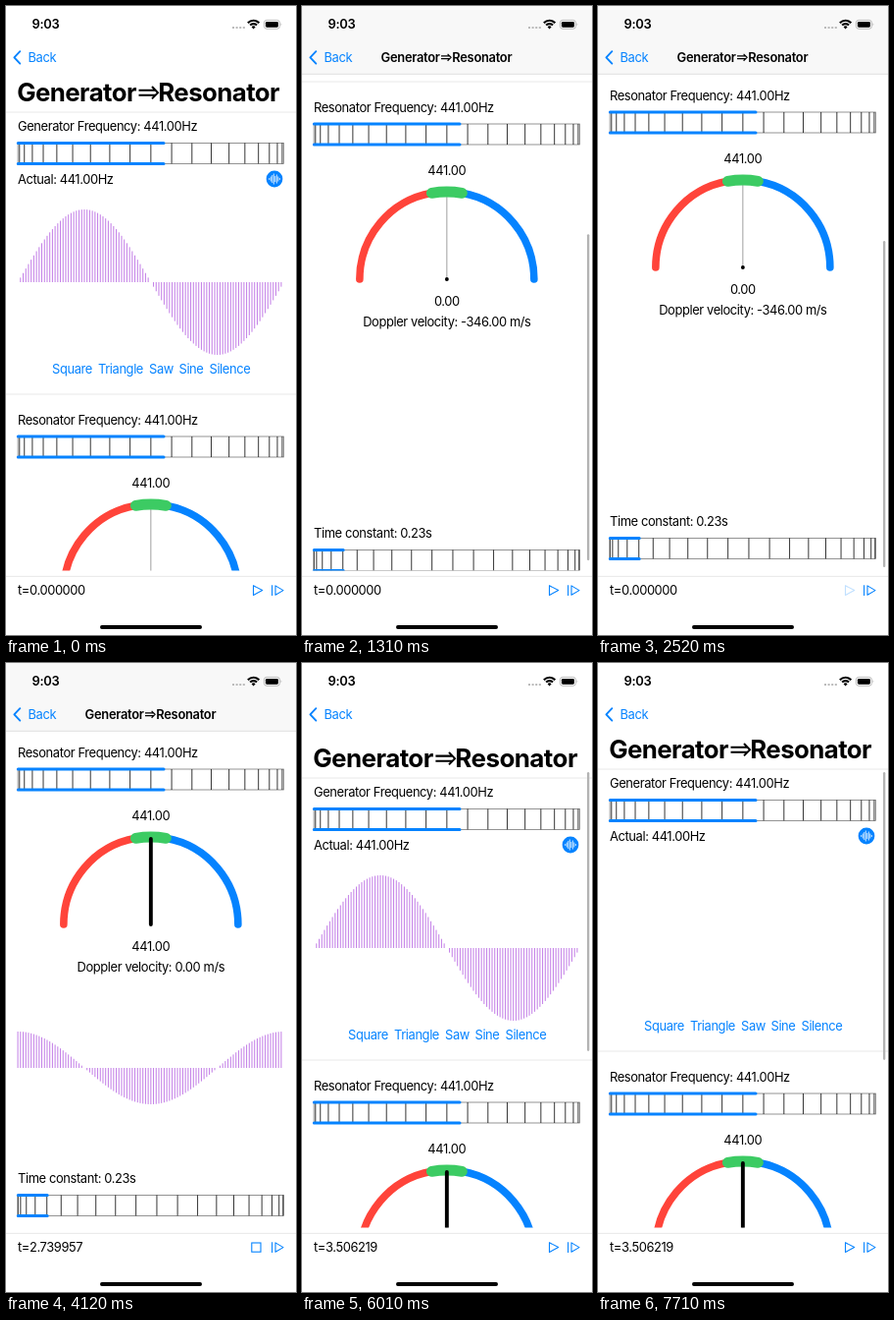
Recreate the animation shown at these times as an HTML page. Size 296 px wide and 640 px high, loop 8 s.

```html
<!DOCTYPE html>
<html lang="en">
<head>
<meta charset="utf-8">
<title>Generator and Resonator</title>
<style>
html, body { margin: 0; height: 100%; overflow: hidden; background: #fff; }
svg { display: block; width: 100vw; height: 100vh; }
text { font: 12.9px Inter, Roboto, sans-serif; letter-spacing: -.03em; white-space: pre; }
.mid { text-anchor: middle; }
.bold { font-weight: 600; letter-spacing: -.022em; }
.large { font-size: 25.8px; font-weight: 700; letter-spacing: -.022em; }
.blue { fill: #0583ff; }
.line { fill: none; stroke: #0583ff; }
.rule { stroke: #e2e2e2; stroke-width: .8; }
.bars { stroke: #af52de; stroke-width: .76; }
</style>
</head>
<body>
<svg id="stage" viewBox="0 0 296 640"></svg>
<script>
const LOOP = 8000, C = 147.85, LEFT = 12.1, WIDTH = 271.5;
const DIAL_Y = 596, R = 89;
const TUNED = 441, SOUND = 346, END = 330, LAST_T = 3.506219;

const text = (x, y, s, cls = '', id = '') => `<text x="${x}" y="${y}" class="${cls}" id="${id}">${s}</text>`;
const rule = y => `<path class="rule" d="M0 ${y}H296"/>`;

// A wheel seen from the side: evenly turned ticks, bunched at both ends
function slider(y, end, turn = 0) {
  let ticks = '';
  for (let k = -10; k <= 9; k++) {
    const a = k * Math.PI / 20 + turn;
    if (Math.abs(a) < 1.57) ticks += `M${C + WIDTH / 2 * Math.sin(a)} ${y}v21`;
  }
  return `<rect x="${LEFT}" y="${y}" width="${WIDTH}" height="21" fill="none" stroke="#666" stroke-width=".7"/>
    <path d="${ticks}" stroke="#111" stroke-width=".85"/>
    <path class="line" stroke-width="3" stroke-linecap="round" d="M12.3 ${y}H${end}M12.3 ${y + 21}H${end}"/>`;
}

function bars(y, amp, wave) {
  let d = '';
  if (amp > .05)
    for (let i = 0; i < 100; i++)
      d += `M${(LEFT + WIDTH * i / 100).toFixed(2)} ${y}v${(-amp * wave(i * Math.PI / 50)).toFixed(2)}`;
  return d;
}

// Arc between two angles in degrees, measured from straight up
function arc(from, to, color, width) {
  const p = a => `${C + R * Math.sin(a * Math.PI / 180)} ${DIAL_Y - R * Math.cos(a * Math.PI / 180)}`;
  return `<path d="M${p(from)}A${R} ${R} 0 0 1 ${p(to)}" fill="none" stroke="${color}" stroke-width="${width}" stroke-linecap="round"/>`;
}

const shapes = [['Square', 47], ['Triangle', 94], ['Saw', 146], ['Sine', 176.5], ['Silence', 207.5]];
const voice = [2, 5, 8, 11, 6, 9, 5, 2].map((h, i) => `M${268.8 + i * 1.5} ${176 - h / 2}v${h}`).join('');
const wifi = r => `M${252.6 - r * .72} ${23 - r * .72}A${r} ${r} 0 0 1 ${252.6 + r * .72} ${23 - r * .72}`;

stage.innerHTML = `
<clipPath id="view"><rect y="69" width="296" height="505.5"/></clipPath>
<g clip-path="url(#view)"><g id="content">
  <g id="heading">
    ${text(11.2, 97, 'Generator', 'large')}
    <path d="M135.5 85.7H152M135.5 90.7H152M149 82l6 6.2-6 6.2" fill="none" stroke="#000" stroke-width="2"/>
    <text x="279" y="97" class="large" text-anchor="end">Resonator</text>
  </g>
  ${rule(108)}
  ${text(12, 127, 'Generator Frequency: 441.00Hz')}
  ${slider(139.4, 161)}
  ${text(12, 181, 'Actual: 441.00Hz')}
  <circle class="blue" cx="274" cy="176" r="8.4"/>
  <path d="${voice}" stroke="#fff" stroke-width=".8"/>
  <path id="input" class="bars"/>
  ${shapes.map(([s, x]) => text(x, 374, s, 'blue')).join('')}
  ${rule(395)}
  ${text(12, 426, 'Resonator Frequency: 441.00Hz')}
  ${slider(438, 161)}
  ${text(C, 490, '441.00', 'mid')}
  ${arc(-90, -10, '#ff443a', 7.6)}
  ${arc(10, 90, '#0583ff', 7.6)}
  <path d="M${C} ${DIAL_Y}v-${R}" stroke="#888" stroke-width=".8"/>
  ${arc(-10, 10, '#3ccb63', 11)}
  <path id="needle" stroke="#000" stroke-width="3.9" stroke-linecap="round"/>
  ${text(C, 622.5, '', 'mid', 'freq')}
  ${text(C, 644, '', 'mid', 'doppler')}
  <path id="output" class="bars"/>
  ${text(12, 859, 'Time constant: 0.23s')}
  ${slider(871.4, 42.2, .045)}
</g></g>
<g id="bar">
  <rect width="296" height="69.3" fill="#f8f8f8"/>
  <path d="M0 69.3H296" stroke="#dadada" stroke-width=".8"/>
  ${text(80.6, 57, 'Generator', 'bold')}
  <path d="M142 50.9h8.4M142 53.7h8.4M148.6 48.9l3.5 3.4-3.5 3.4" fill="none" stroke="#000" stroke-width="1.2"/>
  ${text(153.3, 57, 'Resonator', 'bold')}
</g>
${text(26.5, 23.2, '9:03', 'bold')}
<path d="M231 22h13" stroke="#bbb" stroke-width="2" stroke-dasharray="2 1.6"/>
<path d="${wifi(8)}${wifi(4.8)}" fill="none" stroke="#000" stroke-width="2.1"/>
<path d="M252.6 23.4l-2-2.2a2.8 2.8 0 0 1 4 0z"/>
<rect x="263.4" y="14.4" width="16" height="8.8" rx="2.6" fill="none" stroke="#aaa" stroke-width=".8"/>
<rect x="264.9" y="15.9" width="13" height="5.8" rx="1.4"/>
<path d="M280.6 17.3q1.5 1.5 0 3z" fill="#aaa"/>
<path class="line" stroke-width="1.9" stroke-linecap="round" stroke-linejoin="round" d="M14.3 46.2L8.4 52.4l5.9 6.2"/>
${text(22.5, 57, 'Back', 'blue')}
<rect id="thumb" x="291" width="2.3" rx="1.15" fill="#b3b3b3"/>
${rule(580.4)}
${text(12, 599, '', '', 'clock')}
<path id="play" class="line" stroke-width="1.1" stroke-linejoin="round" d="M252.5 589.7v9.8l9.2-4.9z"/>
<rect id="stop" class="line" stroke-width="1.1" x="250.8" y="590" width="9.2" height="9.2"/>
<path class="line" stroke-width="1.1" stroke-linejoin="round" d="M271.6 589.2v10.8M275 589.9v9.4l8-4.7z"/>
<rect x="96" y="630.1" width="104" height="3.8" rx="1.9"/>`;

const el = id => document.getElementById(id);
const clamp = (v, a, b) => Math.min(b, Math.max(a, v));

// Scroll flings with a bounce at the end, one position per screen refresh
const flings = [
  { at: 5338, step: 111, path: [322, 230, 121.5, 45, 0, -13, -9, -4, -1.5, 0] },
  { at: 870, step: 110, path: [6, 48, 140, 252, 318, 332, 336, 334, 332, 330.7, END] },
];

function scrollAt(ms) {
  const f = flings.find(f => ms >= f.at);
  return f ? f.path[Math.min(f.path.length - 1, Math.floor((ms - f.at) / f.step))] : 0;
}

function clockAt(ms) {
  const tick = Math.floor((ms - 4120) / 107) * 107;
  return clamp(2.739957 + tick * .001785, 0, LAST_T);
}

function drawScroll(ms) {
  const s = scrollAt(ms), folded = clamp(s, 0, 39);
  el('content').setAttribute('transform', `translate(0 ${-s})`);
  const grow = 1 + Math.max(0, -s) * .0008;
  el('heading').setAttribute('transform', `translate(12 97) scale(${grow}) translate(-12 -97)`);
  el('bar').setAttribute('opacity', clamp((s - 34) / 8, 0, 1));

  const over = Math.max(0, -s, s - END);
  el('thumb').setAttribute('y', 111 - folded + Math.max(0, s - 39) * .574);
  el('thumb').setAttribute('height', 293 + folded - over);
  const shown = ms < 870 ? 0 : ms < 2620 || ms >= 5338 ? 1 : clamp(1 - (ms - 2620) / 200, 0, 1);
  el('thumb').setAttribute('opacity', shown);
}

function drawSound(ms) {
  const t = clockAt(ms);
  const amp = 1 - Math.exp(-t / .23);
  const freq = TUNED * (1 - Math.exp(-t / .1));
  const speed = Math.round(SOUND * (freq / TUNED - 1) * 100) / 100 || 0;
  const fade = clamp((ms - 7190) / 500, 0, 1);

  el('input').setAttribute('d', bars(281, 74 * (1 - fade * fade * (3 - 2 * fade)), Math.sin));
  el('output').setAttribute('d', bars(742, 37 * amp, Math.cos));
  el('needle').setAttribute('d', `M${C} ${DIAL_Y}v${-87 * amp - .01}`);
  el('freq').textContent = freq.toFixed(2);
  el('doppler').textContent = `Doppler velocity: ${speed.toFixed(2)} m/s`;
  el('clock').textContent = `t=${t.toFixed(6)}`;

  const running = t > 0 && t < LAST_T;
  el('stop').setAttribute('opacity', running ? 1 : 0);
  el('play').setAttribute('opacity', running ? 0 : ms >= 2520 && t === 0 ? .25 : 1);
}

function frame() {
  const ms = performance.now() % LOOP;
  drawScroll(ms);
  drawSound(ms);
  requestAnimationFrame(frame);
}
frame();
</script>
</body>
</html>
```
